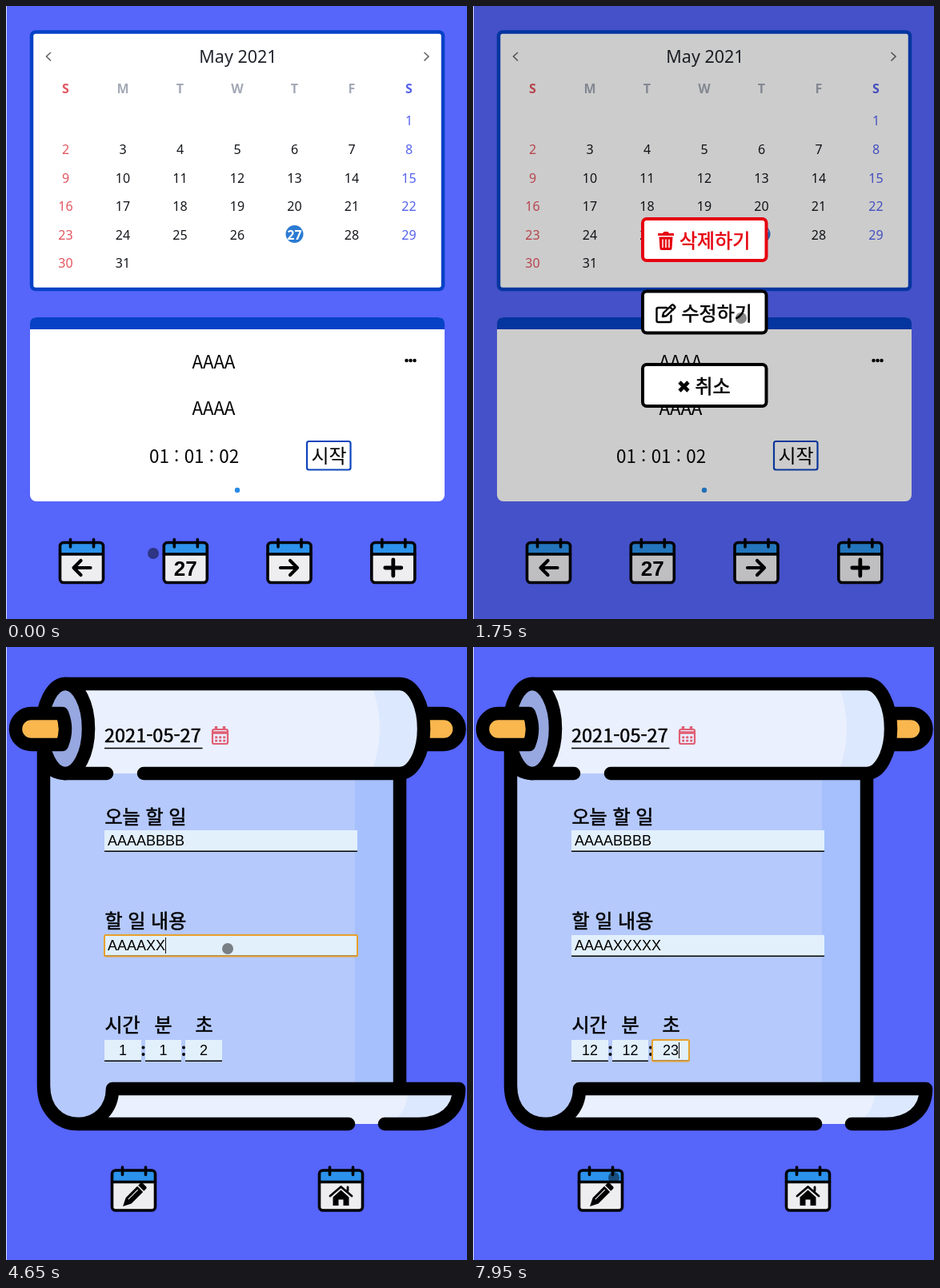
An HTML page for the animation above (8 s loop, 576x766 px).

```html
<!DOCTYPE html>
<html lang="ko">
<head>
<meta charset="utf-8">
<title>Calendar to-do</title>
<style>
  html, body { margin: 0; height: 100%; overflow: hidden; background: #5665fa; }
  svg { display: block; width: 100vw; height: 100vh; }
  text { font-family: "Noto Sans CJK KR", "Noto Sans CJK", sans-serif; font-size: 24px; }
  .body { font-size: 22.4px; }
  .medium { stroke: currentColor; stroke-width: .55px; }
  .day, .head, .month { font-family: "Noto Sans", "Open Sans", sans-serif; text-anchor: middle; }
  .day { font-size: 16px; font-weight: 500; }
  .head { font-size: 16px; font-weight: 700; }
  .month { font-size: 21.5px; font-weight: 500; }
  .input, .number { font-family: "Liberation Sans", Arial, sans-serif; }
  .input { font-size: 18px; }
  .number { font-size: 26px; font-weight: 700; text-anchor: middle; }
  .ink { fill: none; stroke: #000; stroke-linecap: round; stroke-linejoin: round; }
  .thick { stroke-width: 16.5px; }
</style>
</head>
<body>
<svg viewBox="0 0 576 766" preserveAspectRatio="none">
  <defs>
    <g id="icon">
      <rect x="-27" y="-23.5" width="54" height="50" rx="4.5" fill="#eeeef1"/>
      <path d="M-27 -9.500V-19q0 -4.500 4.500 -4.500H22.500q4.500 0 4.500 4.500V-9.500z" fill="#2c92ec"/>
      <rect class="ink" x="-27" y="-23.500" width="54" height="50" rx="4.500" stroke-width="3.600"/>
      <path class="ink" d="M-27 -9H27M-14 -27.500V-18M15 -27.500V-18" stroke-width="3.600"/>
    </g>
    <path id="arrow" class="ink" d="M11 8H-10M-1 -1L-10 8L-1 17" stroke-width="4.200"/>
  </defs>
  <rect width="576" height="766" fill="#5665fa"/>

  <g id="home">
    <rect x="32" y="32.500" width="514" height="321.500" rx="5" fill="#fff" stroke="#0642c6" stroke-width="4.500"/>
    <g fill="none" stroke="#666" stroke-width="1.600">
      <path d="M56 58L50.500 63L56 68.500M522.500 58L528 63L522.500 68.500"/>
    </g>
    <text class="month" x="290" y="71" fill="#22252e">May 2021</text>
    <circle cx="360.500" cy="285" r="11" fill="#2b7bd2"/>
    <g id="days"></g>

    <rect x="30" y="389" width="518" height="230" rx="8" fill="#fff"/>
    <path d="M30 404V397q0 -8 8 -8H540q8 0 8 8V404z" fill="#0642c6"/>
    <g class="body">
      <text class="body" x="232.500" y="453">AAAA</text>
      <text class="body" x="232.500" y="511">AAAA</text>
      <text class="body" x="179" y="571">01 : 01 : 02</text>
    </g>
    <path class="ink" d="M500.500 443h.01M505.500 443h.01M510.500 443h.01" stroke-width="4.500"/>
    <rect x="376" y="544" width="54.500" height="35.500" rx="2.500" fill="#fff" stroke="#0d44bd" stroke-width="2.200"/>
    <text x="381.500" y="570.500">시작</text>
    <circle cx="289" cy="605" r="3.200" fill="#288be6"/>

    <g transform="translate(94.500 694)"><use href="#icon"/><use href="#arrow"/></g>
    <g transform="translate(224.300 694)"><use href="#icon"/><text class="number" y="17.500">27</text></g>
    <g transform="translate(354 694)"><use href="#icon"/><use href="#arrow" transform="scale(-1 1)"/></g>
    <g transform="translate(483.800 694)"><use href="#icon"/><path class="ink" d="M-10 8H10M0 -2V18" stroke-width="4.800"/></g>
  </g>

  <g id="menu">
    <rect width="576" height="766" opacity=".2"/>
    <g fill="#fff" stroke-width="4">
      <rect x="212" y="266" width="154.500" height="52" rx="5" stroke="#e6000f"/>
      <rect x="212" y="356.500" width="154.500" height="52" rx="5" stroke="#000"/>
      <rect x="212" y="448" width="154.500" height="52" rx="5" stroke="#000"/>
    </g>
    <g fill="#e6000f" color="#e6000f">
      <path d="M231 284h6l1.500 -2h5l1.500 2h6v3h-20zM232.500 288.500h17l-1 14.500q-.2 2 -2 2h-11q-1.800 0 -2 -2z"/>
      <path d="M237 291.500v10.500M241 291.500v10.500M245 291.500v10.500" stroke="#fff" stroke-width="1.500"/>
      <text class="medium" x="258" y="301.500">삭제하기</text>
    </g>
    <path class="ink" d="M242 377H231.500q-2 0 -2 2V393q0 2 2 2H245.500q2 0 2 -2V387M237 388l1 -4.500L248.500 373.500q1 -.6 2 .3l1.500 1.500q1 1 0 2L241.500 387.200zM246 376l3.800 3.800" stroke-width="2.400"/>
    <text class="medium" x="260.500" y="392.500">수정하기</text>
    <path d="M258 470L269 481M269 470L258 481" stroke="#000" stroke-width="4.600"/>
    <text class="medium" x="277.500" y="483.500">취소</text>
  </g>

  <g id="editor">
    <path d="M47 140V548C47 578 66 596 90 596S133 578 133 552H492V140z" fill="#b5c9fc"/>
    <path d="M436 150H492V552H436z" fill="#a5c0fc"/>
    <path class="ink thick" d="M492 158V552M73 158Q47 156 47 128V548C47 578 66 596 90 596"/>
    <path class="ink thick" d="M520 83H547a19.500 19.500 0 0 1 0 39H520z" style="fill:#f9b74e"/>
    <path d="M133 552H566C566 580 545 596 515 596H90C114 596 133 578 133 552z" fill="#eaf0fe"/>
    <path d="M503 552H566C566 580 545 596 515 596H473Q500 590 503 552z" fill="#dce8fd"/>
    <path class="ink thick" d="M473 596H515C545 596 566 580 566 552H133C133 578 114 596 90 596H428"/>
    <path d="M73 46H492A30 56 0 0 1 492 158H73z" fill="#eaf0fe"/>
    <path d="M456 46Q478 102 456 158H492A30 56 0 0 0 492 46z" fill="#dce8fd"/>
    <path class="ink thick" d="M73 46H492A30 56 0 0 1 492 158H172M126 158H73"/>
    <ellipse class="ink thick" cx="74" cy="102" rx="29" ry="56" style="fill:#97a7e0"/>
    <path class="ink thick" d="M70 83H31.500a19.500 19.500 0 0 0 0 39H70Q78 102.500 70 83z" style="fill:#f9b74e"/>

    <text class="medium" x="123" y="119" style="font-size:23.500px">2021-05-27</text>
    <path d="M123 126.500H245.500" stroke="#000" stroke-width="1.600"/>
    <rect x="258" y="103" width="19" height="18" rx="2" fill="#eaf0fe" stroke="#e05f74" stroke-width="2.200"/>
    <path d="M257 107h21M262.500 99v5M272.500 99v5" stroke="#e05f74" stroke-width="3.400"/>
    <path d="M261.200 112.800h13M261.200 117.200h13" stroke="#e05f74" stroke-width="2.800" stroke-dasharray="3 2"/>

    <text class="medium" x="123.500" y="220.500">오늘 할 일</text>
    <text class="medium" x="123.500" y="351">할 일 내용</text>
    <text class="medium" x="123.500" y="481">시간</text>
    <text class="medium" x="185.500" y="481">분</text>
    <text class="medium" x="236.500" y="481">초</text>
    <path class="ink" d="M171.500 500.500v.01M171.500 509v.01M222 500.500v.01M222 509v.01" stroke-width="4"/>
    <g id="fields"></g>

    <g transform="translate(159.500 677.500)"><use href="#icon"/>
      <g transform="translate(0 8) rotate(45)">
        <path d="M-5 -17q0 -2 2 -2H3q2 0 2 2V-13H-5zM-5 -11.500H5V9L0 19L-5 9z"/>
        <path d="M-1.500 -9V8" stroke="#eeeef1" stroke-width="1.200"/>
      </g>
    </g>
    <g transform="translate(418.500 677.500)"><use href="#icon"/>
      <path d="M-10 10L0 1L10 10V20.500H3V13H-3V20.500H-10z"/>
      <path class="ink" d="M-13.500 8.500L0 -3L13.500 8.500M8.500 -2.500V2" stroke-width="2.800"/>
    </g>
  </g>

  <circle id="pointer" r="7" opacity=".47"/>
  <rect width="1" height="766" fill="#d5d9fb"/>
</svg>
<script>
const LOOP = 8000, MENU_OPENS = 1100, EDITOR_OPENS = 1950;
const $ = id => document.getElementById(id);

const RED = '#e2565f', BLUE = '#5563ee';
const columnX = column => 74.5 + column * 71.5;
const cell = (kind, column, y, color, label) =>
  `<text class="${kind}" x="${columnX(column)}" y="${y}" fill="${color}">${label}</text>`;
const columnColor = (column, weekday) => column === 0 ? RED : column === 6 ? BLUE : weekday;

let days = [...'SMTWTFS'].map((d, i) => cell('head', i, 108.7, columnColor(i, '#a4a9b6'), d)).join('');
for (let day = 1; day <= 31; day++) {
  const slot = day + 5, column = slot % 7, y = 149.4 + Math.floor(slot / 7) * 35.6;
  const today = day === 27;
  days += cell(today ? 'head' : 'day', column, y, today ? '#fff' : columnColor(column, '#16181d'), day);
}
$('days').innerHTML = days;

// keys: times at which the characters after the first `start` ones are typed
const fields = [
  { x: 123, y: 229, w: 316, text: 'AAAABBBB', start: 4, focus: [2700, 4150], keys: [2950, 3120, 3290, 3460] },
  { x: 123, y: 360, w: 316, text: 'AAAAXXXXX', start: 4, focus: [4150, 5850], keys: [4420, 4600, 4770, 4940, 5110] },
  { x: 123, y: 491, w: 46, text: '12', start: 1, focus: [5850, 6850], keys: [6250], centered: true },
  { x: 174, y: 491, w: 45, text: '12', start: 1, focus: [6850, 7350], keys: [7100], centered: true },
  { x: 224, y: 491, w: 46, text: '23', start: 1, focus: [7350, LOOP], keys: [7600], centered: true },
];

function fieldMarkup({ x, y, w, text, start, focus, keys, centered }, t) {
  const pressed = keys.filter(key => key <= t);
  const count = start + pressed.length;
  const textX = centered ? x + w / 2 - count * 5 : x + 4;
  const caretX = textX + count * (centered ? 10 : 12) + .5;
  const focused = t >= focus[0] && t < focus[1];
  const caretAge = t - Math.max(focus[0], ...pressed);
  return `<rect x="${x}" y="${y}" width="${w}" height="26" fill="#e2f0fc"/>
    <path d="M${x} ${y + 26.2}h${w}" stroke="#000" stroke-width="1.6"/>
    <text class="input" x="${textX}" y="${y + 19.3}">${text.slice(0, count)}</text>` +
    (focused ? `<rect x="${x}" y="${y}" width="${w}" height="26.500" rx="1.500" fill="none" stroke="#e8a02c" stroke-width="2"/>` : '') +
    (focused && caretAge % 1000 < 500 ? `<path d="M${caretX} ${y + 3}v20" stroke="#111"/>` : '');
}

const pointerPath = [
  [0, 184, 684], [100, 184, 684], [800, 505, 448], [1200, 505, 448], [1700, 335, 390],
  [2000, 335, 390], [2500, 282, 243], [3600, 282, 243], [4100, 277, 377], [5200, 277, 377],
  [5800, 152, 506], [6450, 152, 506], [6650, 215, 516], [6750, 205, 507], [7150, 205, 507],
  [7300, 250, 507], [7650, 250, 507], [7950, 176, 663], [LOOP, 176, 663],
];

function pointerAt(t) {
  const i = pointerPath.findIndex(point => point[0] > t);
  const [t0, x0, y0] = pointerPath[i - 1], [t1, x1, y1] = pointerPath[i];
  const p = (t - t0) / (t1 - t0), eased = p * p * (3 - 2 * p);
  return [x0 + (x1 - x0) * eased, y0 + (y1 - y0) * eased];
}

const show = (id, visible) => { $(id).style.display = visible ? '' : 'none'; };

function draw() {
  const t = performance.now() % LOOP;
  const editing = t >= EDITOR_OPENS;
  show('home', !editing);
  show('menu', !editing && t >= MENU_OPENS);
  show('editor', editing);
  if (editing) $('fields').innerHTML = fields.map(field => fieldMarkup(field, t)).join('');
  $('pointer').setAttribute('transform', `translate(${pointerAt(t)})`);
  requestAnimationFrame(draw);
}
draw();
</script>
</body>
</html>
```
